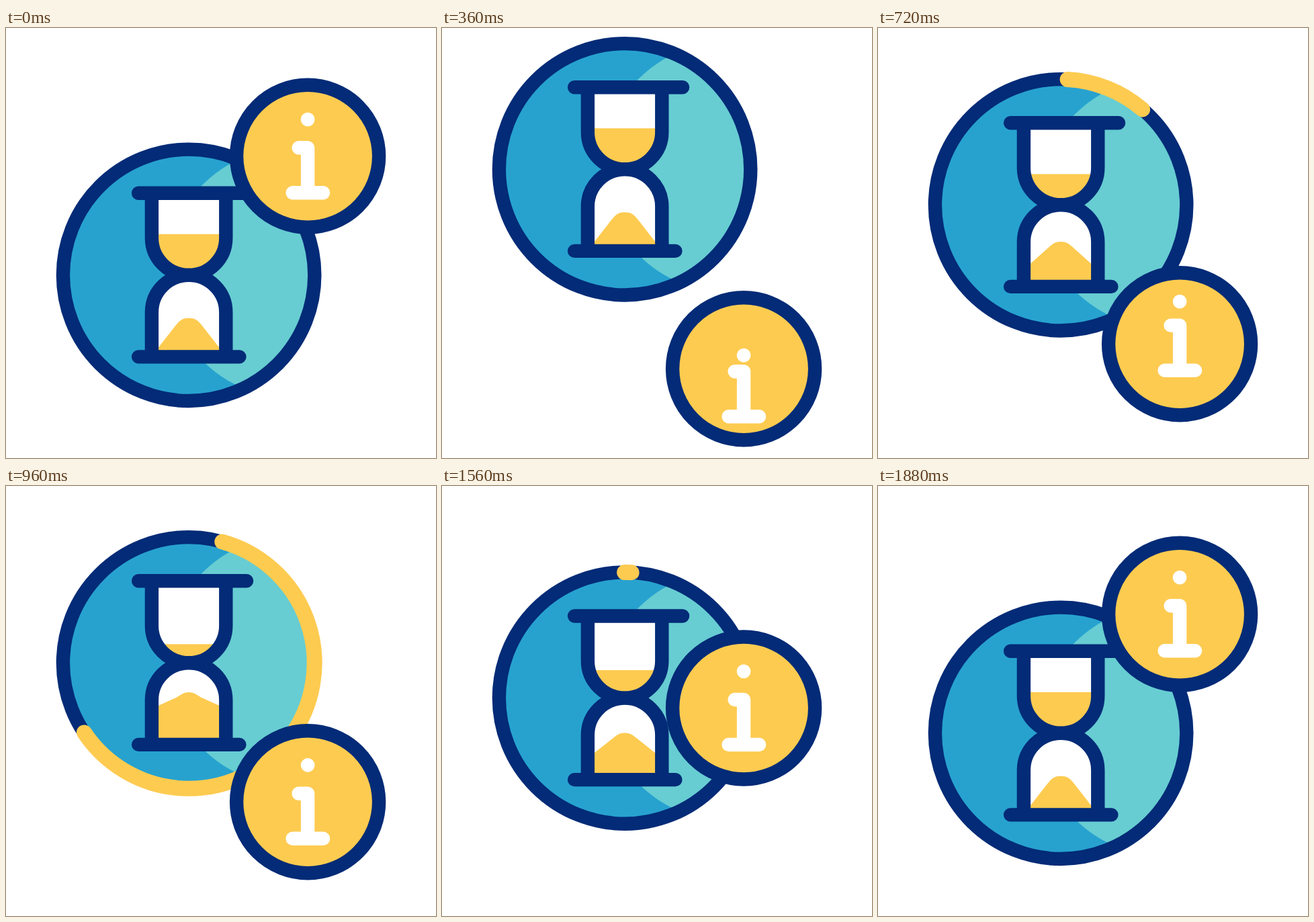
Recreate the animation shown at these times as an HTML page. Size 640 px wide and 640 px high, loop 2 s.

```html
<!DOCTYPE html>
<html lang="en">
<head>
<meta charset="utf-8">
<title>Waiting info</title>
<style>
  html, body { margin: 0; width: 100%; height: 100%; overflow: hidden; background: #fff; }
  svg { display: block; width: 100vw; height: 100vh; }
  .line { fill: none; stroke: #032b77; stroke-width: 20.4; stroke-linecap: round; stroke-linejoin: round; }
  .sand { fill: #fdcb50; }
</style>
</head>
<body>
<svg viewBox="0 0 640 640">
  <defs>
    <clipPath id="disc"><circle r="187"/></clipPath>
    <clipPath id="upper"><path d="M-55.2-122V-55.2A55.2 55.2 0 0 0 55.2-55.2V-122Z"/></clipPath>
    <clipPath id="lower"><path d="M-55.2 121.6V55.2A55.2 55.2 0 0 1 55.2 55.2V121.6Z"/></clipPath>
  </defs>

  <g id="clock">
    <circle r="187" fill="#27a2cf"/>
    <circle cx="152.5" cy="-3.5" r="186" fill="#67cdd2" clip-path="url(#disc)"/>
    <circle class="line" r="187.2"/>
    <path id="progress" class="line" style="stroke:#fdcb50;stroke-width:23"/>
    <g clip-path="url(#upper)">
      <rect x="-60" y="-125" width="120" height="130" fill="#fff"/>
      <rect id="supply" class="sand" x="-60" width="120" height="130"/>
    </g>
    <g clip-path="url(#lower)">
      <rect x="-60" y="-5" width="120" height="130" fill="#fff"/>
      <path id="heap" class="sand"/>
    </g>
    <path class="line" d="M-55.2-122V-55.2A55.2 55.2 0 0 0 55.2-55.2V-122
      M-55.2 121.6V55.2A55.2 55.2 0 0 1 55.2 55.2V121.6
      M-75-122H86M-75 121.6H75.3"/>
  </g>

  <g id="badge">
    <circle class="line" r="106" style="fill:#fdcb50"/>
    <circle id="dot" cy="-54.7" r="10.4" fill="#fff"/>
    <path id="stem" class="line" style="stroke:#fff" d="M-13.5-12.5H0V54.5M-22.5 54.5H23"/>
  </g>
</svg>

<script>
const LOOP = 2000, STEP = 40;
const SOFT = 1 / 3, BRISK = 1 / 6;
const el = id => document.getElementById(id);
const [clock, progress, supply, heap, badge, dot, stem] =
  ['clock', 'progress', 'supply', 'heap', 'badge', 'dot', 'stem'].map(el);

// Symmetric cubic bezier (k, 0, 1 - k, 1), solved by bisection.
function ease(x, k) {
  let lo = 0, hi = 1;
  for (let i = 0; i < 24; i++) {
    const s = (lo + hi) / 2, r = 1 - s;
    const at = 3 * r * r * s * k + 3 * r * s * s * (1 - k) + s * s * s;
    if (at < x) lo = s; else hi = s;
  }
  return lo * lo * (3 - 2 * lo);
}

// Value at time t along [time, value] keys.
function track(t, k, ...keys) {
  if (t <= keys[0][0]) return keys[0][1];
  for (let i = 1; i < keys.length; i++) {
    const [t0, a] = keys[i - 1], [t1, b] = keys[i];
    if (t < t1) return a + (b - a) * ease((t - t0) / (t1 - t0), k);
  }
  return keys[keys.length - 1][1];
}

const move = (node, x, y) => node.setAttribute('transform', `translate(${x} ${y})`);

function arc(from, to) {
  const point = turn => {
    const a = turn * 2 * Math.PI + 0.0536;
    return `${187 * Math.sin(a)} ${-187 * Math.cos(a)}`;
  };
  const middle = (from + to) / 2;
  return `M${point(from)}A187 187 0 0 1 ${point(middle)}A187 187 0 0 1 ${point(to)}`;
}

function heapPath(fallen) {
  const peak = 64 - 24 * fallen;
  const side = 107.5 - 52 * fallen;
  const shoulder = peak + 11.5 - 3.5 * fallen;
  const slope = (side - shoulder) / 25;
  const lead = shoulder - 7 * slope;
  const edge = side + 15 * slope;
  return `M-60 130V${edge}L-20 ${shoulder}C-13 ${lead} -9 ${peak} 0 ${peak}` +
    `S13 ${lead} 20 ${shoulder}L60 ${edge}V130Z`;
}

function draw(t) {
  move(clock, 272.1, track(t, BRISK, [80, 367.8], [360, 210.3], [640, 263.3], [1240, 263.3], [1880, 367.8]));
  move(badge, 449.1, track(t, BRISK, [80, 190.8], [360, 507.2], [640, 470.2], [1240, 470.2], [1880, 190.8]));
  move(stem, 0, track(t, BRISK, [80, 0], [360, 16.5], [640, -20], [920, 0]));
  move(dot, 0, track(t, BRISK, [80, 0], [360, 34.7], [640, -11], [920, 0]));

  const fallen = t < 1240
    ? track(t, SOFT, [410, 0], [1140, 1])
    : track(t, BRISK, [1240, 1], [1880, 0]);
  supply.setAttribute('y', -61 + 39 * fallen);
  heap.setAttribute('d', heapPath(fallen));

  const tail = track(t, SOFT, [880, 0], [1600, 1]);
  const head = track(t, SOFT, [600, 0], [1200, 1]);
  progress.setAttribute('d', head > tail ? arc(tail, head) : '');
}

function tick() {
  const t = performance.now() % LOOP;
  draw(Math.floor(t / STEP) * STEP);
  requestAnimationFrame(tick);
}
draw(0);
requestAnimationFrame(tick);
</script>
</body>
</html>
```
